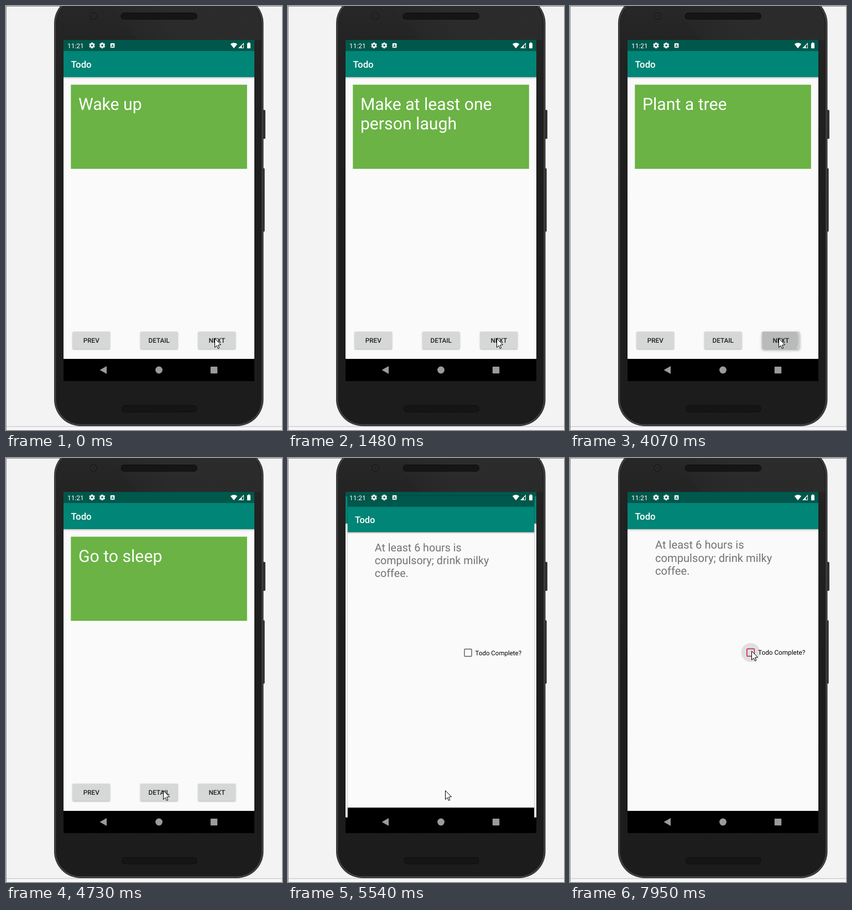
An HTML page with a canvas for the animation above (8 s loop, 499x763 px).

```html
<!DOCTYPE html>
<html lang="en">
<head>
<meta charset="utf-8">
<title>Todo app</title>
<style>
html, body { margin: 0; width: 100%; height: 100%; overflow: hidden; background: #f3f3f3; }
canvas { display: block; width: 499px; height: 763px; }
</style>
</head>
<body>
<canvas id="stage"></canvas>
<script>
const W = 499, H = 763, LOOP = 8000;
const canvas = document.getElementById('stage');
const dpr = window.devicePixelRatio || 1;
canvas.width = Math.round(W * dpr);
canvas.height = Math.round(H * dpr);
const g = canvas.getContext('2d');

// Each track is a list of [start ms, value]; values hold until the next one.
const TODO = [
  [0, ['Wake up']],
  [380, ['Drink coffee']],
  [1330, ['Make at least one', 'person laugh']],
  [2990, ['Plant a tree']],
  [4190, ['Go to sleep']]
];
const IDLE = 0, SPREAD = 1, FULL = 2, FADE = 3;
const NEXT = [
  [0, IDLE], [260, FULL], [380, FADE], [530, IDLE],
  [1060, SPREAD], [1180, FULL], [1330, IDLE],
  [2860, FULL], [2990, FADE], [3110, IDLE],
  [4070, SPREAD], [4190, FADE], [4310, IDLE]
];
const DETAIL = [[0, IDLE], [5150, FULL], [5270, FADE], [5420, IDLE]];
const POINTER = [
  [0, [377, 598]], [4460, [334, 598]], [4580, [289, 598]], [4730, [284, 598]],
  [6610, [304, 470]], [6730, [328, 307]], [6880, [328, 293]],
  [7020, [326, 304]], [7150, [323, 324]], [7280, [325, 339]],
  [7400, [328, 346]], [7550, [328, 347]]
];
const HOME_SCALE = [[0, 1], [5420, 1.004], [5540, 1.044], [5660, 1.045]];
const DETAIL_SCALE = [[5540, 0.978], [5660, 0.996], [5780, 1]];

function at(track, t) {
  let value = track[0][1];
  for (const [start, v] of track) if (t >= start) value = v;
  return value;
}

function rect(x, y, w, h, color) {
  g.fillStyle = color;
  g.fillRect(x, y, w, h);
}

function round(x, y, w, h, r, color) {
  g.beginPath();
  g.roundRect(x, y, w, h, r);
  g.fillStyle = color;
  g.fill();
}

function disc(x, y, r, color) {
  g.beginPath();
  g.arc(x, y, r, 0, Math.PI * 2);
  g.fillStyle = color;
  g.fill();
}

function poly(points, color) {
  g.beginPath();
  points.forEach(([x, y]) => g.lineTo(x, y));
  g.closePath();
  g.fillStyle = color;
  g.fill();
}

function text(str, x, y, size, color, weight = 400, align = 'left') {
  g.font = `${weight} ${size}px Roboto, sans-serif`;
  g.textRendering = 'geometricPrecision';
  g.textAlign = align;
  g.fillStyle = color;
  g.fillText(str, x, y);
}

function gradient(x0, y0, x1, y1, ...stops) {
  const fill = g.createLinearGradient(x0, y0, x1, y1);
  stops.forEach(([p, c]) => fill.addColorStop(p, c));
  return fill;
}

function speaker(x, y, w) {
  round(x, y, w, 12.5, 6.2, '#0e0e0e');
  g.save();
  g.beginPath();
  g.roundRect(x + 1, y + 1, w - 2, 10.5, 5.2);
  g.clip();
  for (let row = 0; row < 4; row++)
    for (let dx = (row % 2) * 1.5; dx < w; dx += 3)
      rect(x + dx, y + 2 + row * 2.5, 1.3, 1.3, '#303030');
  g.restore();
}

// Phone outline, shrunk by an inset on every side.
function shell(inset, color) {
  round(87 + inset, -17 + inset, 378.5 - 2 * inset, 773 - 2 * inset, 48 - inset, color);
}

function phone() {
  rect(0, 0, W, H, '#f3f3f3');
  rect(0, 757, W, 6, '#f7f7f7');
  rect(0, 756, W, 1.5, '#cfcfcf');
  rect(0, 0, W, 1, '#8d8d8d');
  rect(0, 0, 1, H, '#8d8d8d');

  round(463, 187, 6, 52, 1.5, '#343434');
  round(463, 292, 4.7, 114, 1.5, '#343434');
  shell(0, '#262626');
  shell(1, '#414141');
  shell(3.4, '#191919');
  shell(4.4, gradient(0, 0, 0, 755,
    [0, '#272727'], [0.12, '#222222'], [0.5, '#1d1d1d'], [1, '#1c1c1c']));
  poly([[190, 1], [450, 1], [460, 24], [461, 61], [236, 61]],
    gradient(190, 30, 290, 0, [0, 'rgba(48,48,48,0)'], [1, 'rgba(48,48,48,.55)']));

  disc(158, 18, 6.6, '#1b1b1b');
  disc(158, 18, 4.8, '#2c2c2c');
  disc(158, 18, 2.6, '#222222');
  speaker(207.5, 12, 138.5);
  speaker(209, 718.5, 136.5);
}

function windowBase() {
  rect(104, 61, 345, 614, '#000');
  rect(104, 128, 345, 507, '#fafafa');
  rect(104, 61, 345, 20, '#00574b');
  rect(104, 81, 345, 47, '#008577');
  rect(104, 128, 345, 4, gradient(0, 128, 0, 132, [0, 'rgba(0,0,0,.2)'], [1, 'rgba(0,0,0,0)']));
  text('Todo', 117.6, 111, 16.8, '#fff', 500);
}

function button(label, x, state, origin) {
  const y = 586, w = 67.5, h = 31;
  const base = state === FADE ? '#c6c7c7' : state === FULL ? '#b9baba' : '#d6d7d7';
  g.save();
  g.shadowColor = state ? 'rgba(0,0,0,.38)' : 'rgba(0,0,0,.3)';
  g.shadowBlur = (state ? 5 : 2.5) * dpr;
  g.shadowOffsetY = (state ? 2 : 1) * dpr;
  round(x, y, w, h, 1.7, base);
  g.restore();
  if (state === SPREAD) {
    g.save();
    g.beginPath();
    g.roundRect(x, y, w, h, 1.7);
    g.clip();
    rect(x, y, w, h, '#cecfcf');
    disc(origin, y + 15, 36, '#b9baba');
    g.restore();
  }
  text(label, x + w / 2, 605.8, 11.75, '#1f1f1f', 500, 'center');
}

function home(t) {
  windowBase();
  rect(117.3, 141.6, 318.5, 151.4, '#6ab344');
  at(TODO, t).forEach((line, i) => text(line, 130.9, 186.8 + i * 35.4, 30.2, '#fff'));
  button('PREV', 120.5, IDLE);
  button('DETAIL', 243, at(DETAIL, t), 284);
  button('NEXT', 347.5, at(NEXT, t), 377);
}

function detail(t) {
  const pressed = t >= 7950;
  windowBase();
  ['At least 6 hours is', 'compulsory; drink milky', 'coffee.']
    .forEach((line, i) => text(line, 154, 163.3 + i * 23.5, 20.15, '#737373'));
  if (pressed) disc(326.5, 350, 17, '#e0e0e0');
  g.beginPath();
  g.roundRect(319.9, 343.3, 13.4, 13.4, 1);
  g.lineWidth = 1.7;
  g.strokeStyle = pressed ? '#d02a66' : '#737373';
  g.stroke();
  text('Todo Complete?', 340, 354.4, 11.75, '#000');
}

function scaled(k, draw) {
  g.save();
  g.translate(276.5, 368);
  g.scale(k, k);
  g.translate(-276.5, -368);
  draw();
  g.restore();
}

function gear(x, y) {
  for (let i = 0; i < 6; i++) {
    g.save();
    g.translate(x, y);
    g.rotate(i * Math.PI / 3);
    rect(-1.5, -5.2, 3, 3, '#fff');
    g.restore();
  }
  disc(x, y, 3.9, '#fff');
  disc(x, y, 1.8, '#00574b');
}

function systemIcons() {
  text('11:21', 111, 75.6, 11.9, '#fff');
  gear(155.5, 71);
  gear(174, 71);
  round(188.8, 67, 7.6, 8.2, 1, '#fff');
  text('A', 192.6, 73.8, 7, '#00574b', 700, 'center');

  g.beginPath();
  g.moveTo(412, 76.3);
  g.lineTo(405.8, 68.6);
  g.quadraticCurveTo(412, 63.8, 418.2, 68.6);
  g.closePath();
  g.fillStyle = '#fff';
  g.fill();
  poly([[420, 76], [430, 66], [430, 76]], '#fff');
  poly([[426.3, 71.6], [429.1, 68.8], [429.1, 75.1], [426.3, 75.1]], '#00574b');
  round(436, 66.8, 6, 9.4, 0.8, '#fff');
  rect(437.6, 65.6, 2.8, 1.5, '#fff');

  poly([[169.5, 655], [182, 648], [182, 662]], '#9b9b9b');
  disc(276.5, 655, 6.4, '#9b9b9b');
  round(369.8, 648.9, 12.4, 12.4, 1, '#9b9b9b');
}

function pointer([x, y]) {
  g.save();
  g.translate(x + 0.5, y + 0.5);
  poly([[0, 0], [0, 16], [3.6, 12.6], [6, 18], [8.2, 17], [6, 11.6], [11, 11.2]], '#fff');
  g.lineWidth = 1;
  g.lineJoin = 'miter';
  g.strokeStyle = '#000';
  g.stroke();
  g.restore();
}

function frame(now) {
  const t = now % LOOP;
  g.setTransform(dpr, 0, 0, dpr, 0, 0);
  phone();
  g.save();
  g.beginPath();
  g.rect(104, 61, 345, 614);
  g.clip();
  if (t < 5780) scaled(at(HOME_SCALE, t), () => home(t));
  if (t >= 5540) scaled(at(DETAIL_SCALE, t), () => detail(t));
  systemIcons();
  g.restore();
  pointer(at(POINTER, t));
}

const begin = performance.now();
function tick() {
  frame(performance.now() - begin);
  requestAnimationFrame(tick);
}
tick();
</script>
</body>
</html>
```
